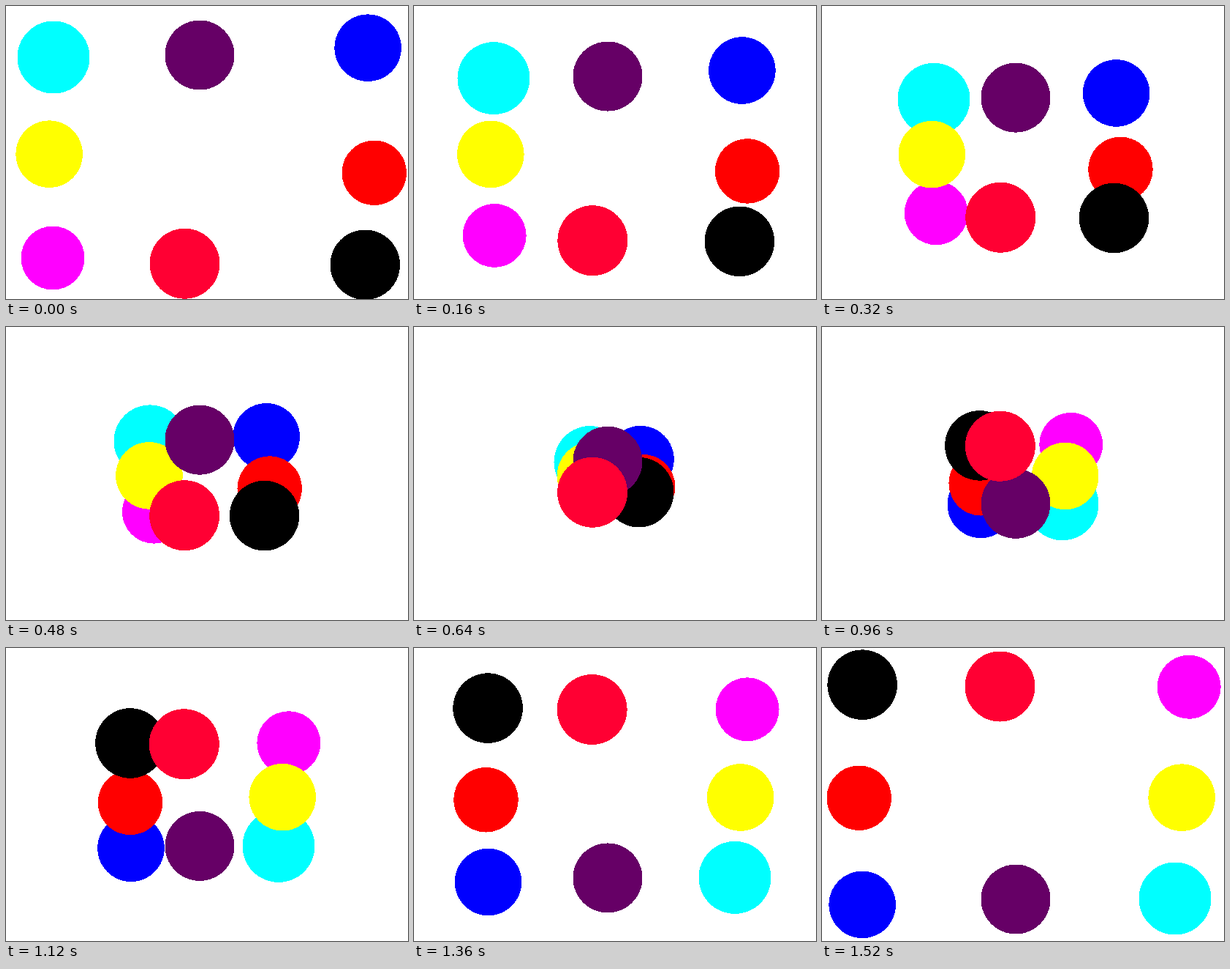
These frames come from a looping animation (550 px wide and 400 px high, 1.6 s). An HTML page without scripts:

```html
<!DOCTYPE html>
<html lang="en">
<head>
<meta charset="utf-8">
<title>Crossing circles</title>
<style>
  html, body { margin: 0; width: 100%; height: 100%; overflow: hidden; background: #fff; }
  svg { display: block; width: 550px; height: 400px; shape-rendering: crispEdges; }

  /* 20 held poses, first and last included */
  circle { animation: cross 1.6s steps(20, jump-none) infinite; }
  @keyframes cross {
    from { cx: var(--x1); cy: var(--y1); }
    to   { cx: var(--x2); cy: var(--y2); }
  }

  .magenta { --x1: 64px;    --y1: 344px;   --x2: 502.2px; --y2: 53.2px;  fill: #f0f; }
  .cyan    { --x1: 65px;    --y1: 70px;    --x2: 483px;   --y2: 342px;   fill: #0ff; }
  .yellow  { --x1: 59.2px;  --y1: 202.2px; --x2: 492.2px; --y2: 204.2px; fill: #ff0; }
  .blue    { --x1: 495.2px; --y1: 57.2px;  --x2: 55.2px;  --y2: 350.4px; fill: #00f; }
  .red     { --x1: 503.8px; --y1: 227.8px; --x2: 50.8px;  --y2: 204.8px; fill: #f00; }
  .black   { --x1: 491.3px; --y1: 353.3px; --x2: 55.2px;  --y2: 50.2px;  fill: #000; }
  .purple  { --x1: 265px;   --y1: 67px;    --x2: 265px;   --y2: 343px;   fill: #606; }
  .crimson { --x1: 244.5px; --y1: 351.7px; --x2: 243.5px; --y2: 52.5px;  fill: #f03; }
</style>
</head>
<body>
<svg viewBox="0 0 550 400">
  <circle class="magenta" r="43.5"/>
  <circle class="cyan" r="49.5"/>
  <circle class="yellow" r="45.8"/>
  <circle class="blue" r="45.8"/>
  <circle class="red" r="44.3"/>
  <circle class="black" r="47.8"/>
  <circle class="purple" r="47.5"/>
  <circle class="crimson" r="48"/>
</svg>
</body>
</html>
```
